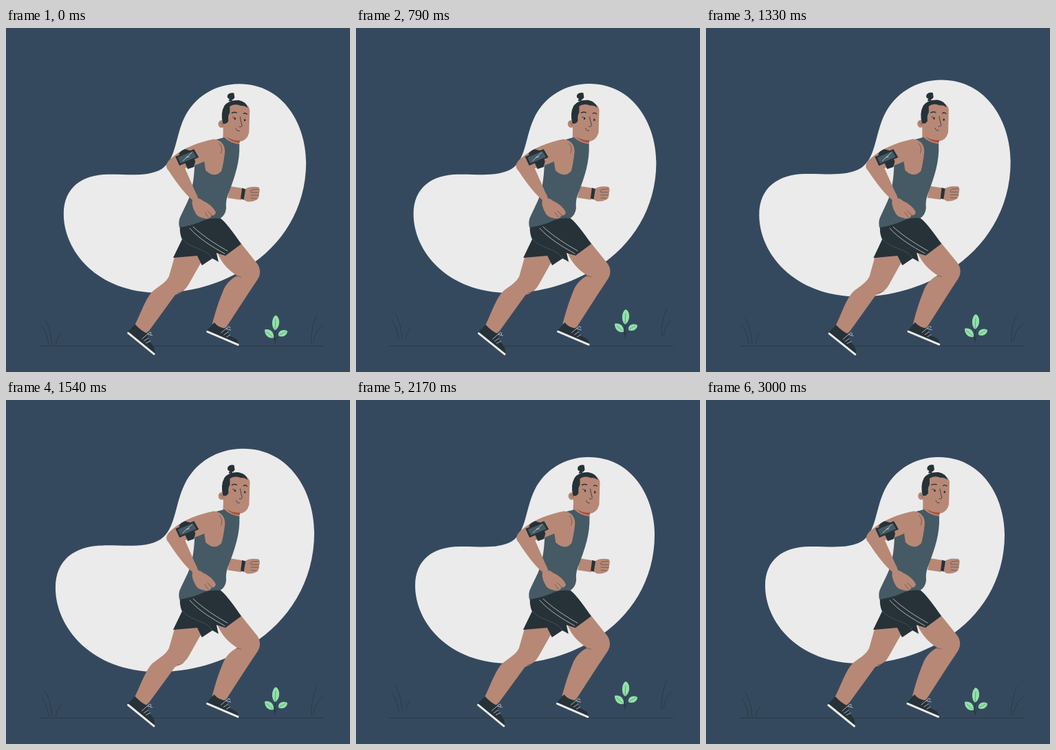
An HTML page for the animation above (3040 ms loop, 500 by 500 pixels).

```html
<!DOCTYPE html>
<html lang="en">
<head>
<meta charset="utf-8">
<title>Runner</title>
<style>
html, body { margin: 0; width: 100%; height: 100%; overflow: hidden; background: #35495e; }
svg { display: block; width: 100%; height: 100%; }
.skin { fill: #b78876; }
.dark { fill: #263238; }
.shirt { fill: #455a64; }
.leaf { fill: #92e3a9; }
.ink, .white, .sole { fill: none; stroke: #263238; stroke-width: .8; stroke-linecap: round; stroke-linejoin: round; }
.white { stroke: #ebebeb; stroke-width: .7; }
.sole { stroke: #ebebeb; stroke-width: 3; }
.faint { opacity: .75; }
</style>
</head>
<body>
<svg viewBox="0 0 500 500">
  <path id="blob" fill="#ebebeb" d="M86 270C86 232 112 213.500 150 213C180 212.500 207 217 227 205C248 191 246 158 260 130C274 102 303 83 338 83C402 83 434 142 434 196C434 262 399 315 350 346C311 371 266 383 224 383C133 383 86 322 86 270Z"/>
  <path class="ink faint" d="M49 462.300H462"/>

  <g id="plants">
    <path class="ink faint" d="M67 461Q66 440 57 424M62 461Q60 445 52 434M72 461Q74 450 80 444M444 459Q443 435 452 417M447 457Q449 440 461 432"/>
    <path class="ink" d="M391 459Q390 450 392 438M391 455Q390 450 386 448M391 455Q393 450 398 447"/>
    <path class="leaf" d="M392 418C399 421 399 435 391 440C385 435 386 421 392 418Z"/>
    <path class="leaf" d="M376 439C384 437 390 443 389 451C381 452 376 447 376 439Z"/>
    <path class="leaf" d="M409 441C401 437 395 442 396 448C402 451 409 447 409 441Z"/>
    <path class="ink" stroke-opacity=".5" d="M392 424L391 440M379 442L388 450M406 442L397 447"/>
  </g>

  <g id="man">
    <!-- far arm -->
    <path class="skin" d="M326 230L344 233L342 250L322 247Z"/>
    <path class="skin" d="M346 235Q353 229 367 231Q370 235 368 239Q368 249 363 250Q358 253 350 252L345 249Z"/>
    <path class="dark" d="M343 232.500L348 234L345.500 249.500L341 248Z"/>
    <path class="ink" stroke-opacity=".6" d="M367 234L357 235Q354 237 356 239L367 239M367 243L356 243M364 248L356 247"/>

    <!-- rear leg -->
    <path class="skin" d="M247 326L237 361C232 371 221 376 213 383C203 393 196 415 187 433Q198 452 209 439L246 388Q260 384 266 372L284 340V326Z"/>
    <path class="ink" stroke-opacity=".5" d="M250 385Q255 385 258 382"/>
    <path class="dark" d="M188 431L177 442L216 474Q218 466 212 459Q205 453 207 445Q197 441 188 431Z"/>
    <path class="sole" d="M178 443.500L215.500 474"/>
    <path class="white" d="M198 452L206 445L213 447M201 455L207 451M206 445Q212 439 211 445M204 458L210 455"/>
    <path class="dark" d="M257 305L243 334L278 331L285 345L303 333Z"/>

    <!-- front leg -->
    <path class="skin" d="M340 311L365 342C371 350 370 359 366 365L352 386L321 434Q310 444 300 430C304 415 309 398 315 384C319 372 328 364 336 360C324 352 314 343 307 326Z"/>
    <path class="ink" stroke-opacity=".5" d="M335 361Q339 360 342 362"/>
    <path class="dark" d="M303 428L292 440L338 460Q339 453 331 450Q321 446 321 437Q309 436 303 428Z"/>
    <path class="sole" d="M293 441.300L337.500 460.300"/>
    <path class="white" d="M313 443L320 437L327 439M317 446L323 442M320 437Q326 431 326 436M321 449L326 446"/>

    <!-- shorts -->
    <path class="dark" d="M253 288Q272 286 288 278Q300 275 311 276Q320 282 342 314L319 331L306 327L309 340Q298 333 288 330Q260 318 255 305Q252 296 253 288Z"/>
    <path class="white" d="M267 291C280 306 300 318 318 328M272 289C287 303 306 315 322 324"/>
    <path class="ink" style="stroke:#455a64" d="M257 307C267 321 294 321 299 334"/>

    <!-- neck and shirt -->
    <path class="skin" d="M316 140L315 161Q324 171 339 171L340 150Z"/>
    <path class="shirt" d="M302 163L317 159Q325 167 339 169C340 195 333 215 322 244Q319 252 320 262Q319 272 311 277Q300 275 289 279Q272 287 252 290Q250 280 254 273L264 252Q273 232 274 198L285 180Z"/>

    <!-- near arm -->
    <path class="skin" d="M302 161.500Q318 164 318 180Q316 198 313 208Q303 219 290 207L288 194Q278 199 260 204L275 238Q281 248 279 256L271 250Q257 239 236 207Q229 200 238 191C258 173 281 166 302 161.500Z"/>
    <path class="skin" d="M271 249Q280 245 286 251Q300 257 305 268Q303 274 299 272Q297 278 290 277Q277 275 275 268Q269 258 271 249Z"/>
    <path class="ink" stroke-opacity=".6" d="M310 168Q316 174 312 182M293 266L299 272M289 268L294 275"/>
    <path class="dark" d="M251 183Q254 178 260 176L270 179L275 194L273 202L264 205L260 196Z"/>
    <path class="dark" d="M246 187L273 176L280 188L252 200Z"/>
    <path class="shirt" d="M249.500 188L271.500 179L276.500 187.500L253.500 197Z"/>
    <path class="white" d="M257 193L270 181M262 188L266 187"/>

    <!-- head -->
    <path class="skin" d="M315 140L316 120Q320 108 335 108Q352 108 354 119L353 152Q350 164 339 165Q327 164 316 157Z"/>
    <path fill="#a8503c" d="M320 158Q329 164 340 163.500L339 167Q327 166 320 158Z"/>
    <ellipse class="skin" cx="313" cy="139.500" rx="4.800" ry="5.500"/>
    <path class="ink" stroke-opacity=".5" d="M311 138Q314 138 315 142"/>
    <path class="dark" d="M315 139Q311 124 317 113Q324 104 338 105Q349 107 351 116Q346 112 341 113Q332 109 325 114L325 123Q322 127 323 135Q321 140 315 139Z"/>
    <path class="dark" d="M323 106L324.500 103Q320 102 322 97Q325 93 331 94.500L332 101Q330 105 328 104L329 107Z"/>
    <path class="ink" style="stroke-width:1.400" d="M328 123.500Q331 121.500 335 123M345 124.500Q347 122.500 350 125"/>
    <ellipse class="dark" cx="332.500" cy="131.700" rx="1.300" ry="1.700"/>
    <ellipse class="dark" cx="346.800" cy="133.700" rx="1.300" ry="1.700"/>
    <path class="ink" d="M340 129Q341 136 343 142Q342 144.500 339 143.500M334 146Q335 150 339 149.500M329 130L331 129.500"/>
  </g>
</svg>
<script>
const LOOP = 3040, LEAD = 37;
const $ = id => document.getElementById(id);
const blob = $('blob'), man = $('man'), plants = $('plants');

// Linear interpolation through [position, value] stops
function track(u, stops) {
  const i = stops.findIndex(s => u <= s[0]) || 1;
  const [a, x] = stops[i - 1], [b, y] = stops[i];
  return x + (y - x) * (u - a) / (b - a);
}

const beat = [[0, 1], [.1, 1.1], [.3, 1], [.4, 1], [.5, 1.1], [.6, 1], [1, 1]];
const sway = [[0, 0], [.25, 1], [.75, -1], [1, 0]];
const float = [[0, 0], [.5, -10], [1, 0]];

function draw() {
  const u = (performance.now() + LEAD) % LOOP / LOOP;
  const half = u * 2 % 1;
  blob.setAttribute('transform', `translate(260 233) scale(${track(u, beat)}) translate(-260 -233)`);
  man.setAttribute('transform', `rotate(${track(half, sway)} 273 285)`);
  plants.setAttribute('transform', `translate(0 ${track(half, float)})`);
  requestAnimationFrame(draw);
}
draw();
</script>
</body>
</html>
```
